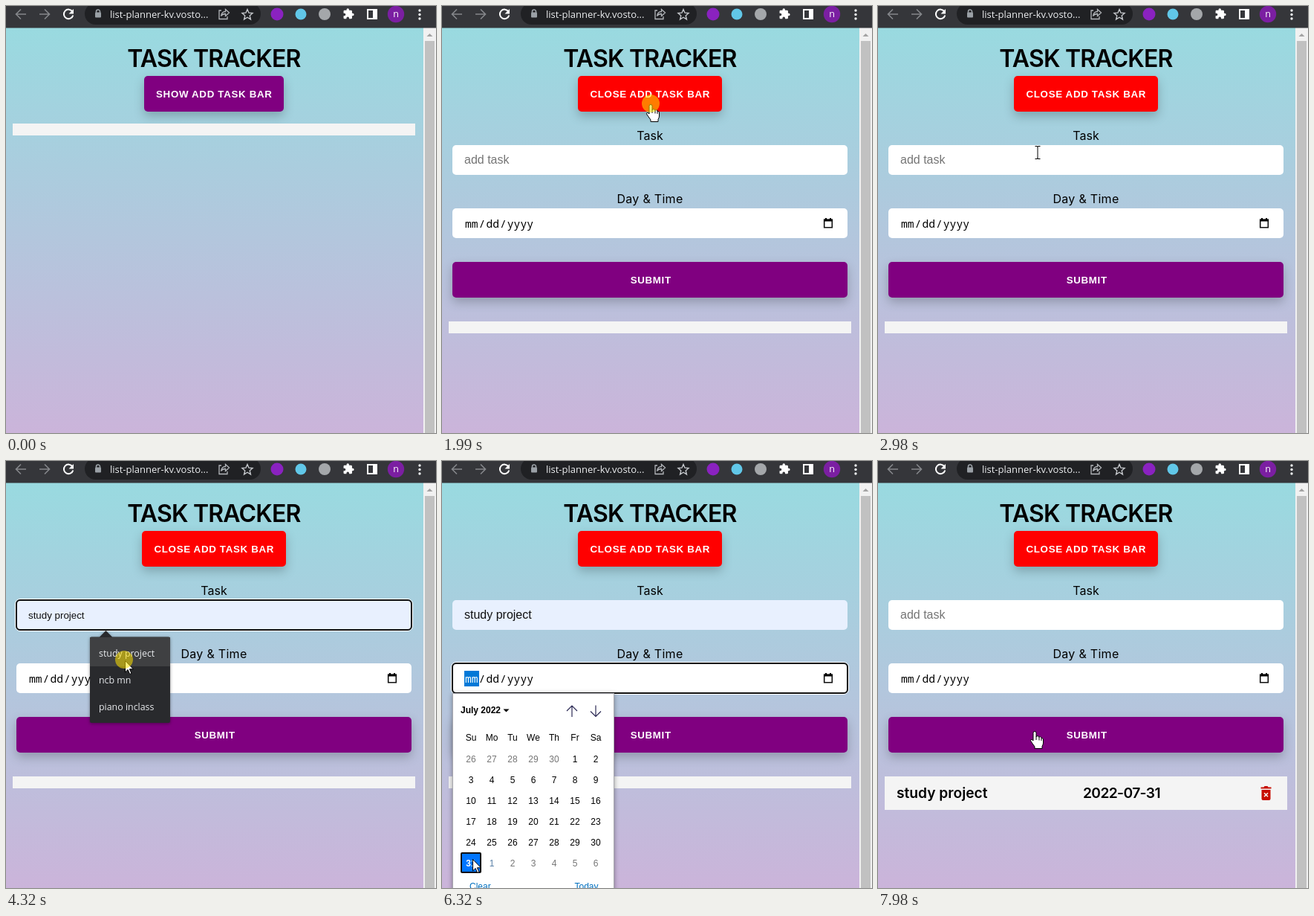
An HTML page that plays this animation: 579x574 px, repeating every 8000 ms.

```html
<!DOCTYPE html>
<html lang="en">
<head>
<meta charset="utf-8">
<title>Task tracker demo</title>
<style>
  html, body { margin: 0; width: 100%; height: 100%; overflow: hidden; background: #cab5d9; }
  svg { display: block; width: 579px; height: 574px; font-family: "Liberation Sans", Arial, sans-serif; }
  .geo { font-family: Inter, sans-serif; }
  .ui { font-family: "Open Sans", sans-serif; }
  .mid { text-anchor: middle; }
  .btn { font-weight: 700; font-size: 13.333px; letter-spacing: .05em; fill: #fff; text-anchor: middle; }
  .box { filter: drop-shadow(0 6px 7px rgba(0, 0, 0, .22)); }
  .label { font-size: 16px; text-anchor: middle; }
  .date { font: 14.67px "Noto Sans Mono", monospace; }
  .item { font: 600 19.2px Inter, sans-serif; }
  .cal { font-size: 12px; }
  .line { fill: none; stroke-width: 1.6; }
  .hide { display: none; }
</style>
</head>
<body>
<svg viewBox="0 0 579 574">
  <defs>
    <linearGradient id="sky" x1="0" y1="0" x2="0" y2="1">
      <stop offset="0" stop-color="#99dae0"/>
      <stop offset="1" stop-color="#cbb4da"/>
    </linearGradient>
  </defs>

  <!-- page -->
  <rect y="29" width="562" height="545" fill="url(#sky)"/>
  <text class="geo mid" x="280" y="81.5" font-size="32" font-weight="600" letter-spacing="-.8">TASK TRACKER</text>
  <rect id="toggle" class="box" y="94" height="48" rx="5"/>
  <text id="toggleText" class="btn" x="280.3" y="123"></text>
  <rect id="list" x="9" width="542" fill="#f4f4f4"/>

  <g id="form">
    <text class="geo label" x="280" y="180">Task</text>
    <rect id="taskBox" x="14" y="187" width="532" height="40" rx="5"/>
    <text id="taskText" x="30" y="212"></text>
    <rect id="caret" x="121" y="198" width="1" height="18"/>
    <text class="geo label" x="280" y="265" letter-spacing=".3">Day &amp; Time</text>
    <rect x="14" y="272" width="532" height="40" rx="5" fill="#fff"/>
    <rect id="dateSel" x="30" y="282" width="20" height="21" fill="#0078d7"/>
    <text class="date" y="298"><tspan id="mm" x="31"></tspan><tspan x="49.6">/</tspan><tspan id="dd" x="59.4"></tspan><tspan x="78">/</tspan><tspan id="yy" x="87.8"></tspan></text>
    <path d="M514.7 287.5h10.6v10.3h-10.6z" class="line" stroke="#111"/>
    <path d="M514 286.5h12v3h-12zM516 285h2v3h-2zM522 285h2v3h-2z"/>
    <rect class="box" x="14" y="344" width="532" height="48" rx="5" fill="#800080"/>
    <text class="btn" x="281.2" y="373">SUBMIT</text>
    <g id="ring" fill="none">
      <rect x="12.5" y="-1.5" width="535" height="43" rx="6.5" stroke="#fff"/>
      <rect x="14" y="0" width="532" height="40" rx="5" stroke="#101010" stroke-width="2"/>
    </g>
  </g>

  <g id="entry">
    <text class="item" x="25" y="453">study project</text>
    <text class="item" x="276" y="453" letter-spacing="-.6">2022-07-31</text>
    <path fill="#c70d00" d="M515.5 438.5h4l1-1.5h4l1 1.5h4v2h-14zM516.5 442h12v12q0 2-2 2h-8q-2 0-2-2z"/>
    <path d="M520 446.2l5 5m0-5l-5 5" class="line" stroke="#f4f4f4"/>
  </g>

  <g id="menu">
    <path fill="#292a2d" style="filter:drop-shadow(0 1px 2px rgba(0,0,0,.4))" d="M126 236.5l8.500-8.500 8.500 8.500h76q2 0 2 2v111.500q0 2-2 2h-104q-2 0-2-2v-111.500q0-2 2-2z"/>
    <rect id="hover" x="113" y="237" width="108" height="39" fill="#3f4042"/>
    <g class="ui" font-size="12.4" fill="#e8eaed">
      <text x="125" y="263">study project</text>
      <text x="125" y="299">ncb mn</text>
      <text x="125" y="335">piano inclass</text>
    </g>
  </g>

  <g id="calendar" class="cal">
    <rect x="14.500" y="312.500" width="217" height="280" fill="#fff" stroke="#a9a9b0" style="filter:drop-shadow(0 1px 3px rgba(0,0,0,.4))"/>
    <text x="25" y="339" font-weight="700">July 2022</text>
    <path d="M82.500 333.500h8l-4 4z"/>
    <path class="line" style="stroke-width:1.2" stroke="#2c2a55" d="M175 344v-15m-7 7l7-7 7 7M207 328.500v15m-7-7l7 7 7-7"/>
    <rect id="cell" width="28" height="28" rx="2" fill="#dfe6f2"/>
    <rect x="26" y="527" width="26" height="26" rx="1" fill="#0075ff" stroke="#101010" stroke-width="2"/>
    <g id="days" class="mid"></g>
    <g fill="#0070c0"><text x="37" y="576">Clear</text><text x="178.500" y="576">Today</text></g>
  </g>

  <!-- scrollbar -->
  <path fill="#f1f1f1" d="M562 29h17v545h-17z"/>
  <path fill="#c1c1c1" d="M564 47h13v527h-13z"/>
  <path fill="#a3a3a3" d="M566.500 41h8l-4-4z"/>

  <!-- browser bar -->
  <rect width="579" height="29.500" fill="#35363a"/>
  <rect x="106" y="-4" width="237" height="29" rx="14.500" fill="#202124"/>
  <g class="line">
    <path stroke="#85878b" d="M27 11H14m6-6.500L13.500 11l6.500 6.500M45 11h13m-6-6.500L58.500 11l-6.500 6.500"/>
    <path stroke="#fff" stroke-width="2" d="M89.500 7.500A6.300 6.300 0 1 0 90.300 12.500"/>
    <path stroke="#9aa0a6" d="M121.500 9V7.500a2.500 2.500 0 0 1 5 0V9"/>
    <path stroke="#b4b7bb" stroke-width="1.300" d="M290 6h-3v11.500h11V14M289.500 13.500q1-6 6-6V4.500l5 4.500-5 4.500v-3q-4 0-6 3z"/>
    <path stroke="#c4c7cb" stroke-width="1.400" d="M325 4.500l2 4.700 5 .4-3.800 3.300 1.200 5-4.400-2.700-4.400 2.700 1.200-5-3.800-3.300 5-.4z"/>
    <path stroke="#fff" stroke-width="2" d="M487 5h12v12h-12z"/>
  </g>
  <path fill="#fff" d="M91 4v6.500h-6.500zM494 5h5v12h-5z"/>
  <rect x="120" y="8.500" width="8" height="7" rx="1" fill="#9aa0a6"/>
  <text class="ui" x="140" y="16" font-size="13" fill="#eceef0">list-planner-kv.vosto...</text>
  <circle cx="365" cy="11" r="8.500" fill="#8a22c0"/>
  <circle cx="397" cy="11" r="7.500" fill="#61c7e8"/>
  <circle cx="429" cy="11" r="8" fill="#a4a7aa"/>
  <path fill="#fff" transform="translate(453.200 2.500) scale(.67)" d="M20.500 11H19V7q0-2-2-2h-4V3.500a2.500 2.500 0 0 0-5 0V5H4Q2 5 2 7v3.800h1.500a2.700 2.700 0 0 1 0 5.400H2V20q0 2 2 2h3.800v-1.500a2.700 2.700 0 0 1 5.400 0V22H17q2 0 2-2v-4h1.500a2.500 2.500 0 0 0 0-5z"/>
  <circle cx="525" cy="11" r="11.200" fill="#7b1fa2"/>
  <text class="ui mid" x="525" y="15" font-size="12.500" fill="#fff">n</text>
  <g fill="#f1f3f4"><circle cx="557" cy="6" r="1.700"/><circle cx="557" cy="11.500" r="1.700"/><circle cx="557" cy="17" r="1.700"/></g>

  <!-- pointers -->
  <path id="arrow" fill="#fff" stroke="#000" d="M.5 .5V16l3.600-3.500 2.600 6 2.300-1-2.600-5.700h5z"/>
  <path id="hand" fill="#fff" stroke="#000" d="M-2 13V2.500Q-2 .5 0 .5T2 2.500V8q0-1.500 2-1.300T6 8.800Q6 7.500 7.500 7.600T9 9.800q2-1 2.500 1.200V16q0 2-1.500 4.500V23.500H0V21l-5-7q-1-2 0-2.500t3 1.500zM2 8v4M6 9v3.500M9 10v3"/>
  <path id="beam" class="line" stroke="#000" style="stroke-width:1" d="M-3.500-8.500h3l.5 1 .5-1h3M0-8V8.500M-3.500 8.500h3l.5-1 .5 1h3"/>
  <circle id="click" r="12" fill="#ffe100" fill-opacity=".55"/>
</svg>

<script>
const LOOP = 8000;
const $ = id => document.getElementById(id);
const show = (id, on) => $(id).classList.toggle("hide", !on);
const put = (id, pos) => {
  show(id, pos);
  if (pos) $(id).setAttribute("transform", `translate(${pos})`);
};
const attrs = (id, map) => {
  for (const k in map) $(id).setAttribute(k, map[k]);
};

// Changes add up over the loop; click, cell and caret last one step only.
const steps = [
  [0, {}],
  [330, { arrow: [327, 237] }],
  [660, { arrow: null, hand: [281, 132] }],
  [990, { click: [281, 131] }],
  [1330, { open: true }],
  [1990, { click: [281, 131] }],
  [2320, { open: false }],
  [2650, { click: [281, 131] }],
  [2980, { open: true, hand: null, beam: [215, 197] }],
  [3330, { focus: "task", menu: true, beam: [213, 211] }],
  [3650, { beam: null, arrow: [161, 250], hover: true }],
  [3990, { task: "preview", arrow: [161, 274] }],
  [4320, { arrow: [160, 268], click: [159, 267] }],
  [4650, { task: "filled", menu: false, arrow: [514, 307] }],
  [4990, { caret: true, arrow: [516, 298], click: [516, 297] }],
  [5320, { focus: "date", calendar: true, arrow: [513, 297] }],
  [5660, { arrow: [204, 467], cell: [193, 443] }],
  [5990, { arrow: [95, 526], cell: [81, 499] }],
  [6320, { arrow: [41, 535] }],
  [6650, { click: [41, 535] }],
  [6980, { calendar: false, date: true, arrow: [68, 511] }],
  [7320, { arrow: [181, 405] }],
  [7650, { arrow: null, hand: [211, 363] }],
  [7980, { focus: null, task: null, date: false, entry: true }]
];

function stateAt(index) {
  const s = {};
  for (let i = 0; i <= index; i++)
    Object.assign(s, { click: null, cell: null, caret: false }, steps[i][1]);
  return s;
}

function draw(s) {
  attrs("toggle", s.open
    ? { x: 183, width: 194, fill: "#f00" }
    : { x: 186, width: 188, fill: "#800080" });
  $("toggleText").textContent = (s.open ? "CLOSE" : "SHOW") + " ADD TASK BAR";
  attrs("list", { y: s.open ? 424 : 158, height: s.entry ? 45 : 16 });

  for (const id of ["arrow", "hand", "beam", "click", "cell"]) put(id, s[id]);
  put("ring", s.focus && [0, s.focus === "task" ? 187 : 272]);
  for (const [id, on] of [["form", s.open], ["entry", s.entry], ["menu", s.menu],
    ["hover", s.hover], ["calendar", s.calendar], ["caret", s.caret]]) show(id, on);

  attrs("taskBox", { fill: s.task ? "#e8f0fe" : "#fff" });
  attrs("taskText", {
    fill: s.task ? "#111" : "#757575",
    "font-size": s.task === "preview" ? 13.333 : 16
  });
  $("taskText").textContent = s.task ? "study project" : "add task";

  const picked = s.focus === "date";
  show("dateSel", picked);
  attrs("mm", { fill: picked ? "#fff" : "#000" });
  const parts = s.date ? ["07", "31", "2022"] : ["mm", "dd", "yyyy"];
  ["mm", "dd", "yy"].forEach((id, i) => $(id).textContent = parts[i]);
}

function addDay(text, col, y, fill, weight = 400) {
  const el = document.createElementNS("http://www.w3.org/2000/svg", "text");
  el.textContent = text;
  el.setAttribute("x", 39 + 28 * col);
  el.setAttribute("y", y);
  el.setAttribute("fill", fill);
  el.setAttribute("font-weight", weight);
  $("days").append(el);
}

["Su", "Mo", "Tu", "We", "Th", "Fr", "Sa"].forEach((d, i) => addDay(d, i, 376, "#000"));
for (let i = 0; i < 42; i++) {
  const day = new Date(2022, 5, 26 + i);
  const inMonth = day.getMonth() === 6, n = day.getDate();
  const last = inMonth && n === 31;
  const fill = last ? "#fff" : inMonth ? "#000" : i === 36 ? "#5a80a8" : "#757575";
  addDay(n, i % 7, 405 + 28 * Math.floor(i / 7), fill, last ? 700 : 400);
}

const start = performance.now();
let current = -1;
function tick() {
  const t = (performance.now() - start) % LOOP;
  let index = 0;
  while (index + 1 < steps.length && steps[index + 1][0] <= t) index++;
  if (index !== current) draw(stateAt(current = index));
  requestAnimationFrame(tick);
}
tick();
</script>
</body>
</html>
```
